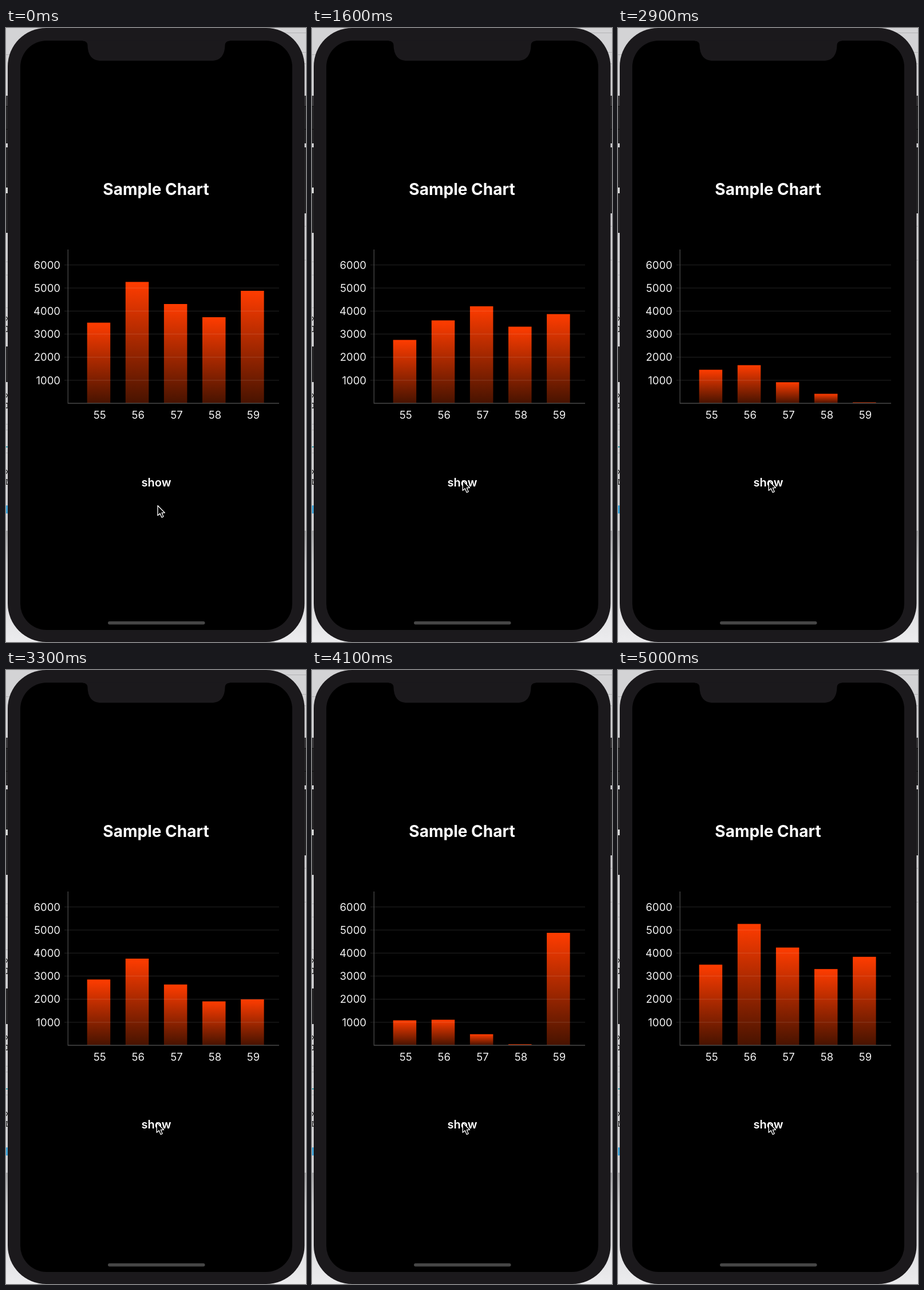
An HTML page for the animation above (5.1 s loop, 524x1070 px).

```html
<!DOCTYPE html>
<html lang="en">
<head>
<meta charset="utf-8">
<title>Bar chart</title>
<style>
  html, body { margin: 0; width: 100%; height: 100%; overflow: hidden; background: #d3d3d5; }
  svg { display: block; width: 100%; height: 100%; }
  text { font-family: Inter, "Open Sans", sans-serif; fill: #fff; }
  .labels text { font-size: 18.5px; fill: #f2f2f2; }
</style>
</head>
<body>
<svg viewBox="0 0 524 1070">
  <defs>
    <linearGradient id="heat" x2="0" y2="1">
      <stop stop-color="#ff3c00"/>
      <stop offset="1" stop-color="#481300"/>
    </linearGradient>
    <linearGradient id="floor" x2="0" y2="1">
      <stop stop-color="#a9a9ab"/>
      <stop offset=".3" stop-color="#d0d0d2"/>
      <stop offset="1" stop-color="#ececee"/>
    </linearGradient>
  </defs>

  <!-- desktop behind the phone -->
  <rect width="524" height="1070" fill="#d3d3d5"/>
  <path d="M0 876H524V1070H0Z" fill="url(#floor)"/>
  <path d="M0 118H6V201H0ZM0 208H6V357H0ZM0 555H6V617H0ZM518 118H524V201H518ZM518 208H524V323H518Z" fill="#252426"/>
  <path d="M0 118H6V137H0ZM518 118H524V137H518Z" fill="#3a393b"/>
  <path d="M0 136.500H6M0 176.500H6M518 136.500H524M518 176.500H524" stroke="#0c0c0c"/>
  <path d="M0 46.500H6M0 407.500H6M0 430.500H6M0 487.500H6M0 690.500H6M0 700.500H6M0 740.500H6M480 8.500H524M510 42.500H524M516 62.500H524M518 345.500H524M518 404.500H524" stroke="#b4b4b6"/>
  <path d="M0 503l3 3-3 4M0 520h3v9H0M0 637l3 3-3 4M0 654h3v8H0M0 770l3 3-3 4M0 787h2l-2 8h3" fill="none" stroke="#222" stroke-width="1.300"/>
  <path d="M0 278H3V288H0Z" fill="#ddd"/>
  <path d="M0 729H5V731H0Z" fill="#3c9fae"/>
  <path d="M0 832H5V846H0Z" fill="#46a9dc"/>

  <!-- phone -->
  <rect x="3" y="0" width="518.500" height="1070" rx="67" fill="#1b191c"/>
  <rect x="25" y="22" width="475" height="1027" rx="46"/>
  <path d="M134 21.500V22.500Q142 22.500 142.500 30C143 47 150 57 166 57H359C375 57 382 47 382.500 30Q383 22.500 391 22.500V21.500Z" fill="#1b191c"/>
  <rect x="178" y="1034" width="169.500" height="5.500" rx="2.750" fill="#464646"/>

  <text x="262" y="291" font-size="28" font-weight="700" text-anchor="middle">Sample Chart</text>
  <g id="bars" fill="url(#heat)"></g>
  <g id="grid" stroke="#fff" stroke-opacity=".11" stroke-width="1.300"></g>
  <path d="M108.300 386V654H477" fill="none" stroke="#484848" stroke-width="1.300"/>
  <g id="labels" class="labels"></g>
  <text x="262.500" y="799" font-size="20" font-weight="600" text-anchor="middle">show</text>
  <path id="cursor" d="M0 0V17.200L4 13.600L7 20.500L10 19.200L7.100 12.500H12.300Z" fill="#000" stroke="#fff" stroke-width="1.300" stroke-linejoin="round"/>
</svg>
<script>
const $ = id => document.getElementById(id);
const LOOP = 5100, STEP = 100, STAGGER = 102;
const BASE = 654, UNIT = 40.18;
const heights = [140.5, 211.5, 173, 150, 196];

// Each run restarts the bars one after another and lets them grow linearly.
const runs = [
  { start: 1050, rate: 1, from: [.236, .235, .631, .646, .651] },
  { start: 2484, rate: 1 },
  { start: 3781, rate: .97 }
];

function add(parent, tag, attrs, text = '') {
  const el = document.createElementNS('http://www.w3.org/2000/svg', tag);
  for (const key in attrs) el.setAttribute(key, attrs[key]);
  el.textContent = text;
  return $(parent).appendChild(el);
}

for (let k = 1; k <= 6; k++) {
  const y = BASE - k * UNIT;
  add('grid', 'path', { d: `M102 ${y}H477` });
  add('labels', 'text', { x: 95, y: y + 6.8, 'text-anchor': 'end' }, k * 1000);
}

const bars = heights.map((h, i) => {
  const x = 141.7 + i * 67.1;
  add('labels', 'text', { x: x + 22, y: 681, 'text-anchor': 'middle' }, 55 + i);
  return add('bars', 'rect', { x, width: 40.5 });
});

function growth(i, t) {
  let value = 1;
  for (const { start, rate, from } of runs) {
    const age = t - start - i * STAGGER;
    if (age >= 0) value = Math.min(1, (from ? from[i] : 0) + age * rate / 1000);
  }
  return value;
}

function draw(now) {
  const t = Math.floor(now % LOOP / STEP) * STEP;
  bars.forEach((bar, i) => {
    const h = heights[i] * growth(i, t);
    bar.setAttribute('y', BASE - h);
    bar.setAttribute('height', h);
  });

  const p = Math.min(1, t / 600), ease = p * p * (3 - 2 * p);
  const settle = t >= 1200 ? 1.5 : 0;
  $('cursor').setAttribute('transform',
    `translate(${265 - 1.8 * ease} ${832.3 - 45 * ease + settle})`);
}

function tick() {
  draw(performance.now());
  requestAnimationFrame(tick);
}
tick();
</script>
</body>
</html>
```
